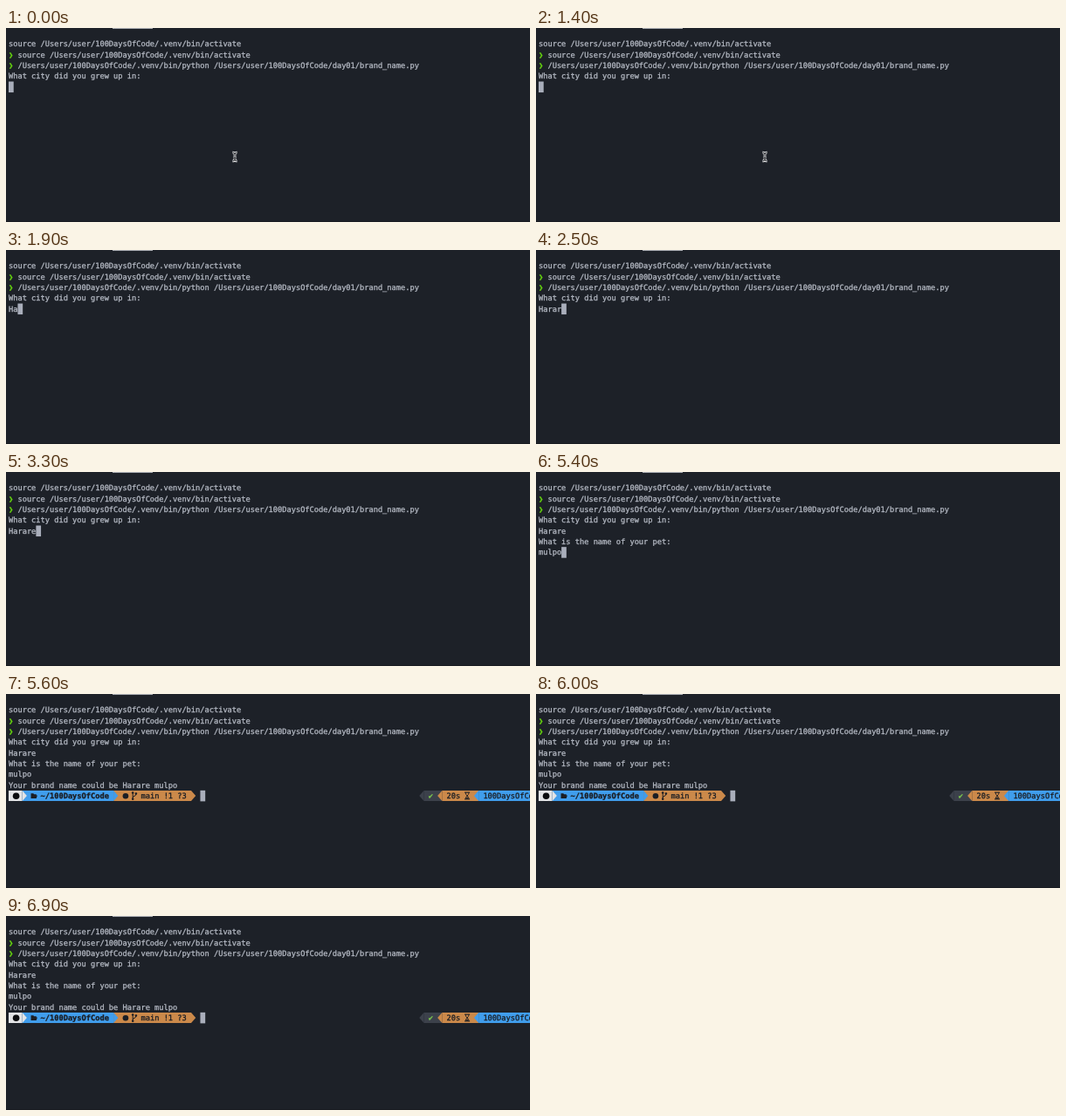
An HTML page with a canvas that plays this animation: 600x223 px, repeating every 7000 ms.

```html
<!DOCTYPE html>
<html lang="en">
<head>
<meta charset="utf-8">
<title>Terminal session</title>
<style>
  html, body { margin: 0; width: 100%; height: 100%; overflow: hidden; background: #1d2128; }
  canvas { display: block; width: 600px; height: 223px; }
</style>
</head>
<body>
<canvas id="screen" width="600" height="223"></canvas>
<script>
const ctx = document.getElementById('screen').getContext('2d');
const LOOP = 7000;
const LEFT = 3, CELL = 5.225, TOP = 12.2, ROW = 12.33, ASCENT = 9.2;
const FONT = '8.68px "DejaVu Sans Mono", monospace';
const C = {
  bg: '#1d2128', text: '#b4b9c3', cursor: '#a9aebb', chevron: '#66d60f',
  white: '#e2e3e5', blue: '#409dec', tan: '#cb894a', grey: '#3c414b',
  check: '#7cc850', ink: '#1b1e24'
};

const ENV = '/Users/user/100DaysOfCode/.venv/bin/';
const ACTIVATE = 'source ' + ENV + 'activate';
const RUN = ENV + 'python /Users/user/100DaysOfCode/day01/brand_name.py';
const CITY = 'Harare', PET = 'mulpo';
// Moment of each key press, in ms.
const CITY_KEYS = [1500, 1800, 2000, 2200, 2500, 2600];
const PET_KEYS = [4600, 4700, 4900, 5200, 5300];
const CITY_ENTER = 3600, PET_ENTER = 5600;

const colX = col => LEFT + col * CELL;
const rowY = row => TOP + row * ROW;

// A hairline stroke gives the glyphs the weight of smoothed terminal type.
function write(str, col, row, color = C.text, weight = '') {
  const x = colX(col), y = rowY(row) + ASCENT;
  ctx.font = weight + ' ' + FONT;
  ctx.textRendering = 'geometricPrecision';
  ctx.fillStyle = ctx.strokeStyle = color;
  ctx.lineWidth = 0.3;
  ctx.lineJoin = 'round';
  ctx.fillText(str, x, y);
  ctx.strokeText(str, x, y);
}

function block(col, row, color, cells) {
  ctx.fillStyle = color;
  ctx.fillRect(colX(col), Math.round(rowY(row)), cells * CELL, 12);
}

function cursor(col, row) {
  ctx.fillStyle = C.cursor;
  ctx.fillRect(colX(col), rowY(row), CELL + 0.5, ROW + 0.2);
}

function polygon(points, color) {
  ctx.beginPath();
  points.forEach(([x, y]) => ctx.lineTo(x, y));
  ctx.closePath();
  ctx.fillStyle = color;
  ctx.fill();
}

function dot(x, y, r, color = C.ink) {
  ctx.beginPath();
  ctx.arc(x, y, r, 0, 2 * Math.PI);
  ctx.fillStyle = color;
  ctx.fill();
}

function arrow(col, row, color, dir) {
  const y = Math.round(rowY(row));
  const base = colX(dir > 0 ? col : col + 1);
  polygon([[base, y], [base + dir * CELL, y + 6], [base, y + 12]], color);
}

function folder(x, y) {
  polygon([[x, y - 3], [x + 2.8, y - 3], [x + 3.6, y - 2], [x + 6.2, y - 2],
    [x + 6.2, y - 0.7], [x + 7.4, y - 0.7], [x + 6.2, y + 2.8], [x, y + 2.8]], C.ink);
}

function branch(x, y) {
  ctx.strokeStyle = C.ink;
  ctx.lineWidth = 1;
  ctx.beginPath();
  ctx.moveTo(x + 1.3, y - 3);
  ctx.lineTo(x + 1.3, y + 3.5);
  ctx.moveTo(x + 5, y - 2);
  ctx.bezierCurveTo(x + 5, y + 1, x + 1.3, y - 0.3, x + 1.3, y + 2.3);
  ctx.stroke();
  [[1.3, -3.6], [5, -2.6], [1.3, 3.8]].forEach(([dx, dy]) => dot(x + dx, y + dy, 1.25));
}

function hourglass(x, y) {
  ctx.fillStyle = C.ink;
  ctx.fillRect(x, y - 4.4, 6, 1.1);
  ctx.fillRect(x, y + 3.3, 6, 1.1);
  ctx.strokeStyle = C.ink;
  ctx.lineWidth = 0.9;
  ctx.beginPath();
  ctx.moveTo(x + 1, y - 3.6);
  ctx.bezierCurveTo(x + 1, y - 0.5, x + 5, y + 0.5, x + 5, y + 3.6);
  ctx.moveTo(x + 5, y - 3.6);
  ctx.bezierCurveTo(x + 5, y - 0.5, x + 1, y + 0.5, x + 1, y + 3.6);
  ctx.stroke();
  polygon([[x + 1.4, y + 3.4], [x + 3, y + 1.2], [x + 4.6, y + 3.4]], C.ink);
}

function prompt(row) {
  const mid = Math.round(rowY(row)) + 6;

  block(0, row, C.white, 3);
  block(3, row, C.blue, 20);
  arrow(3, row, C.white, 1);
  block(23, row, C.tan, 17);
  arrow(23, row, C.blue, 1);
  arrow(40, row, C.tan, 1);
  dot(11.6, mid + 0.3, 3.8, '#0c0d0f');
  folder(colX(5) - 0.6, mid + 0.3);
  write('~/100DaysOfCode', 7, row, C.ink, 'bold');
  dot(colX(25) + 3.3, mid + 0.3, 3.3);
  branch(colX(27) - 0.2, mid);
  write('main !1 ?3', 29, row, C.ink);

  arrow(90, row, C.grey, -1);
  block(91, row, C.grey, 4);
  arrow(94, row, C.tan, -1);
  block(95, row, C.tan, 8);
  arrow(102, row, C.blue, -1);
  block(103, row, C.blue, 12);
  write('✔', 92, row, C.check);
  write('20s', 96, row, C.ink);
  hourglass(colX(100) - 0.4, mid);
  write('100DaysOfCode', 104, row, C.ink);
}

function pointer(x, y) {
  ctx.beginPath();
  for (const s of [-1, 1]) {
    ctx.moveTo(x - 2.8, y + s * 5);
    ctx.quadraticCurveTo(x, y + s * 5, x, y + s * 3);
    ctx.quadraticCurveTo(x, y + s * 5, x + 2.8, y + s * 5);
  }
  ctx.moveTo(x, y - 4);
  ctx.lineTo(x, y + 4);
  ctx.moveTo(x - 1.6, y + 1.5);
  ctx.lineTo(x + 1.6, y + 1.5);
  for (const [width, color] of [[2.7, '#e4e5e7'], [0.9, '#17191d']]) {
    ctx.lineWidth = width;
    ctx.strokeStyle = color;
    ctx.stroke();
  }
}

const typed = (word, keys, t) => word.slice(0, keys.filter(k => k <= t).length);

function answer(word, keys, row, t, enter) {
  const str = typed(word, keys, t);
  write(str, 0, row);
  if (t < enter) cursor(str.length, row);
}

function draw(t) {
  ctx.fillStyle = C.bg;
  ctx.fillRect(0, 0, 600, 223);
  ctx.fillStyle = '#a9acb2';
  ctx.fillRect(122, 0, 46, 1);
  ctx.fillStyle = '#181b21';
  ctx.fillRect(0, 222, 600, 1);

  write(ACTIVATE, 0, 0);
  [ACTIVATE, RUN].forEach((cmd, i) => {
    write('❯', 0, i + 1, C.chevron, 'bold');
    write(cmd, 2, i + 1);
  });
  write('What city did you grew up in:', 0, 3);
  answer(CITY, CITY_KEYS, 4, t, CITY_ENTER);
  if (t >= CITY_ENTER) {
    write('What is the name of your pet:', 0, 5);
    answer(PET, PET_KEYS, 6, t, PET_ENTER);
  }
  if (t >= PET_ENTER) {
    write(`Your brand name could be ${CITY} ${PET}`, 0, 7);
    prompt(8);
    cursor(42, 8);
  }
  if (t < CITY_KEYS[0]) pointer(262, 148);
}

function tick() {
  draw(performance.now() % LOOP);
  requestAnimationFrame(tick);
}
tick();
</script>
</body>
</html>
```
